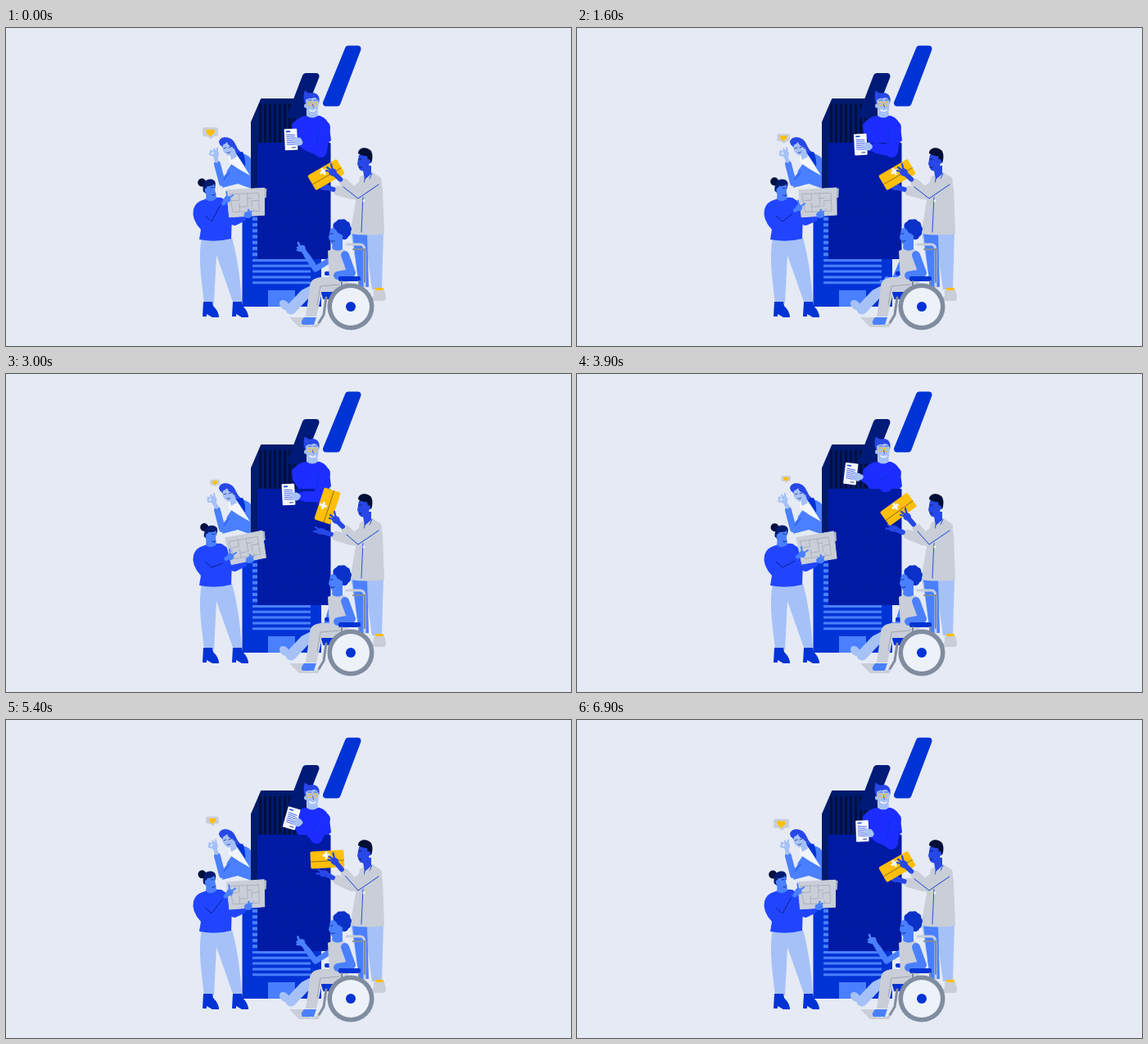
An HTML page with a canvas for the animation above (7 s loop, 690 by 388 pixels).

```html
<!DOCTYPE html>
<html lang="en">
<head>
<meta charset="utf-8">
<title>Team around a tower</title>
<style>
html, body { margin: 0; width: 100%; height: 100%; overflow: hidden; background: #e5eaf4; }
canvas { display: block; width: 690px; height: 388px; }
</style>
</head>
<body>
<canvas id="stage"></canvas>
<script>
const LOOP = 7000, STEP = 100;
const BG = '#e5eaf4', NAVY = '#000f3f', DARK = '#001a6e', PANEL = '#001ba6', BLUE = '#0033d5',
  VIVID = '#1c2dff', SWEATER = '#2145ff', MID = '#2747e6', SKY = '#4a80ff', PALE = '#a6c1f7',
  GRAY = '#c9ced8', STEEL = '#808c9f', GOLD = '#ffbf0a', WHITE = '#f3f6fc';

const canvas = document.getElementById('stage');
const ratio = window.devicePixelRatio || 1;
canvas.width = 690 * ratio;
canvas.height = 388 * ratio;
const c = canvas.getContext('2d');
c.lineCap = c.lineJoin = 'round';
let t = 0;

// Motion: one cosine per loop, or eased moves [from, to, ...change] added to a rest pose
const wave = (mid, amp, peak) => mid + amp * Math.cos((t - peak) / LOOP * 2 * Math.PI);
function ramp(from, to) {
  const u = Math.min(1, Math.max(0, (t - from) / (to - from)));
  return u * u * (3 - 2 * u);
}
const travel = (rest, ...moves) => rest.map((v, i) =>
  moves.reduce((sum, [from, to, ...change]) => sum + ramp(from, to) * (change[i] || 0), v));

function fill(color, d, round = 0) {
  const p = new Path2D(d);
  c.fillStyle = c.strokeStyle = color;
  c.fill(p);
  if (round) { c.lineWidth = round; c.stroke(p); }
}
function line(color, width, d) {
  c.strokeStyle = color;
  c.lineWidth = width;
  c.stroke(new Path2D(d));
}
function oval(color, x, y, rx, ry = rx, tilt = 0) {
  c.fillStyle = color;
  c.beginPath();
  c.ellipse(x, y, rx, ry, tilt, 0, 7);
  c.fill();
}
function rect(color, x, y, w, h, r = 0) {
  c.fillStyle = color;
  c.beginPath();
  c.roundRect(x, y, w, h, r);
  c.fill();
}
const limb = (color, width, ...pts) => line(color, width, 'M' + pts.map(p => p[0] + ' ' + p[1]).join('L'));
const toward = (a, b, f) => [a[0] + (b[0] - a[0]) * f, a[1] + (b[1] - a[1]) * f];

function at([x, y, deg = 0], draw, scale = 1) {
  c.save();
  c.translate(x, y);
  c.rotate(deg * Math.PI / 180);
  c.scale(scale, scale);
  draw();
  c.restore();
}

function bubble() {
  at([wave(252.5, -3, 0), wave(129, 6, 2000)], () => {
    rect(GRAY, -9.5, -6.5, 19, 11, 2.5);
    fill(GRAY, 'M-4 4H5L1 8Z');
    fill(GOLD, 'M0 4.5C-8 -1 -5 -5 -2 -4Q0 -4 0 -2.5Q0 -4 3 -4C6 -4 7 0 0 4.5Z');
  }, wave(.79, .21, 0));
}

function wavingWoman() {
  const hand = [wave(253.5, 1.5, 0), 152.5, wave(-6, 6, 0)];
  fill(MID, 'M260 140C260 132 272 131 278 138C283 146 283 150 289 152Q294 158 290 163L276 161Z');
  fill(SKY, 'M283 155L289 153Q299 156 300 162V196L283 190L264 195L270 174Z');
  fill(WHITE, 'M272 155L281 153L298 180L284 172L272 164Z');
  fill(BLUE, 'M281 153L289 151Q293 160 292 169Z');
  fill(PALE, 'M272 150L279 147L282 157L275 161Z');
  oval(PALE, 271, 147, 6.3, 8.3, -.35);
  fill(MID, 'M261 143Q264 133 273 136L278 146Q271 144 270 139Q267 143 261 143Z');
  line(DARK, .7, 'M266 147l3 -1M272 146l3 -1M270 152q3 1 4 -1');
  limb(SKY, 8, [258, 166], [264, 189], [277, 175]);
  line(BLUE, .7, 'M266 185L273 176');
  limb(PALE, 5, [257, 162], [hand[0] + 1, hand[1] + 3]);
  at(hand, () => {
    oval(PALE, 1, 1, 4, 5);
    line(PALE, 2.2, 'M-1 0L-5 -3M3 -1L3 -6M0 0L-1 -5M-2 3L-6 2L-5 -2');
    oval(BG, -2.5, 0, 1.2);
  });
}

function towerBack() {
  fill(BLUE, 'M418 25.5H429.5L404.5 91.5H391Z', 8);
  fill(DARK, 'M312 87H366V142H307V232H300V115Z', 2);
  for (let x = 309; x < 352; x += 6) rect(NAVY, x, 93, 3, 47);
  fill('#001a78', 'M366 59H378.5L360 106H348Z', 8);
}

function topMan() {
  fill(VIVID, 'M349 118Q356 108 367 107H383Q393 110 395 121L397 137L388 146H361L350 129Z');
  at([374, 108, t < 800 ? 1.5 * Math.sin(t / 800 * Math.PI) : 0], () => {
    c.translate(-374, -108);
    fill(PALE, 'M368 98H380L381 107Q374 112 367 107Z');
    fill(MID, 'M365 92C363 87 363 81 365 76Q369 81 374 79C382 79 384 86 382 92Z');
    fill(PALE, 'M366 88Q369 85 373 86Q379 83 382 90L381 100Q378 106 374 106Q368 105 367 99Z');
    oval(PALE, 366, 95, 2, 2.7);
    for (const x of [368.5, 374.8]) line(GOLD, 1, `M${x} 92.5a2.5 2.5 0 1 0 5 0a2.5 2.5 0 1 0 -5 0`);
    line(MID, .8, 'M369 88h4M376 88h4M374.5 93l1 4');
    line(WHITE, 1.6, 'M371 100Q375 103 378 100');
  });
}

function towerFront() {
  rect(BLUE, 288.5, 226, 96.5, 114);
  rect(PANEL, 307, 140, 89.5, 142, 1);
  for (let y = 144; y < 280; y += 4) for (let x = 310; x < 395; x += 4) rect('#001893', x, y, 1.4, 1.4);
  for (let y = 231; y < 279; y += 7.2) rect(SKY, 301, y, 6, 4);
  for (let i = 0; i < 5; i++) rect(SKY, 301, 282 + i * 6.8, 71, 3);
  rect(SKY, 320, 320, 33, 20);
}

function cardArm() {
  const card = travel([348, 136, -3], [0, 3000, -3, 11], [3000, 4000, -11, -26, 10],
    [4800, 5900, 26, -2, 16], [6100, 7000, -12, 17, -26]);
  const elbow = travel([384, 150], [3000, 4000, -7, -14], [4800, 5900, 4, 12], [6100, 7000, 3, 2]);
  const wrist = [card[0] + 7, card[1] + 2];
  limb(VIVID, 16, [388, 121], elbow);
  limb(VIVID, 13, elbow, toward(wrist, elbow, .42));
  limb(VIVID, 10, elbow, toward(wrist, elbow, .25));
  line(BLUE, .8, `M382 123L${elbow[0] - 5} ${elbow[1] - 8}`);
  limb(PALE, 6, wrist, toward(wrist, elbow, .15));
  at(card, () => {
    rect(WHITE, -7.8, -13, 15.6, 26, 1);
    rect(BLUE, -5.5, -10.5, 5, 1.4);
    for (let y = -6; y < 7; y += 2.3) line(MID, .8, `M-5 ${y}L5 ${y + 1}`);
    line(DARK, .8, 'M1 10H5');
    oval(PALE, 9, 3, 4.5, 5);
    line(PALE, 2.6, 'M8 0L4 -2M8 3L3 2M8 6L4 6');
  });
}

function plannerWoman() {
  const plan = travel([293, 213, -2], [0, 1000, 3.5, 1, 10], [1000, 2100, -3.5, -2, -18], [3000, 6000, 0, 1, 8]);
  const holder = [plan[0] + 2 - plan[2] * .26, plan[1] + 15];
  const pointer = [wave(272.5, 2.5, 4000), 208 + 14 * (ramp(400, 2200) - ramp(3000, 6000))];
  fill(PALE, 'M239 256H276C282 277 286 305 288 334H277L257 277L254 336H242C239 308 234 280 239 256Z');
  for (const x of [241, 277]) fill(BLUE, `M${x} 334h11l1 5q7 7 7 14h-8l-7-4v3h-5z`);
  limb(SWEATER, 10, [270, 232], [279, 236], toward(holder, [275, 238], .35));
  fill(SWEATER, 'M240 210Q250 206 263 207Q275 213 276 228L275 257Q256 262 236 258L238 246Q226 233 229 221Q232 212 240 210Z');
  fill(SKY, 'M245 200H256L257 208Q251 214 244 209Z');
  at([249, 203, wave(2, 6, 2900)], () => {
    oval(NAVY, -9, -15, 5);
    fill('#001a70', 'M-8 -4C-9 -16 -3 -20 4 -18Q9 -16 7 -9L-1 -8L-3 0Z');
    fill(SKY, 'M-3 -10Q4 -10 6 -13L7 0Q6 7 1 6Q-5 5 -5 -3Z');
    oval(SKY, -4, -5, 2, 3);
    line(DARK, .8, 'M2 -8h2M6 -8h1M3 1Q6 2 7 0');
  });
  at(plan, () => {
    fill('#adb5c4', 'M20 -17L26 -16L25 -5L21 -5Z');
    fill(GRAY, 'M-23 -16L23 -17L22 16L-21 17Z', 1);
    line('#a3acbb', .8, 'M-19 -11H16V11H-16ZM-8 -11V-3H-18M-8 1V11M-8 5H2V-11M2 -5H8M16 -2H7V5M2 8V11M9 11V8');
  });
  oval(SKY, ...holder, 5, 4);
  line(SKY, 2.3, `M${holder}l4 -4m-4 4l1 -6`);
  const elbow = [245, 241], wrist = toward(pointer, elbow, .18);
  limb(SWEATER, 14, [237, 221], elbow);
  limb(SWEATER, 11, elbow, toward(pointer, elbow, .38));
  line(DARK, .8, `M243 229L251 236L${pointer[0] - 9} ${pointer[1] + 9}`);
  limb(SKY, 5, wrist, pointer);
  oval(SKY, pointer[0], pointer[1] + 1, 4);
  line(SKY, 2, `M${pointer}l-1 -8m2 8l6 -4`);
}

function doctor() {
  const kit = travel([391, 179, -30], [2200, 3000, 1.5, -18, -42], [3100, 4700, 0, 8, 72], [5000, 7000, -1.5, 10, -30]);
  const top = travel([399, 176], [2200, 3000, 4, 2], [3100, 4700, 0, -8], [4800, 6200, -4, 6]);
  const low = travel([389, 194], [2200, 3000, -4, -2], [3100, 4700, 3, -7], [4800, 6600, 1, 9]);
  fill(PALE, 'M421 248H461L459 319H447L441 275L440 300H429Z');
  fill(SKY, 'M423 250H441L443 316H431Z');
  rect(GOLD, 451, 317, 10, 3);
  fill(GRAY, 'M449 320H462Q466 331 462 333H446Q446 329 449 327Z');
  const lowElbow = [422, 203];
  limb(GRAY, 12, [438, 190], lowElbow, toward(low, lowElbow, .5));
  limb(MID, 6, low, toward(low, lowElbow, .32));
  oval(MID, ...low, 6, 4);
  line(MID, 2.4, `M${low}l-7 -5m7 6l-9 -1`);
  fill(GRAY, 'M432 182Q441 176 449 177Q458 181 460 196L462 251Q441 254 420 251L428 206Z');
  fill(MID, 'M435 168H446L446 178L438 185Z');
  fill(MID, 'M431 155Q438 149 444 156L443 171Q438 177 432 173L429 166Z');
  fill('#000d35', 'M430 153C430 145 441 144 446 150Q449 157 446 165L442 161L441 156Q435 157 430 153Z');
  oval(MID, 443, 163, 2, 3);
  line(NAVY, .8, 'M431 160h3M431 170h3');
  line(BLUE, .8, 'M438 184L436 204L434 249M447 177L439 196');
  oval(WHITE, 437, 211, 1.4);
  at(kit, () => {
    rect(GOLD, -20.5, -10.5, 41, 21, 2);
    line('#8c6b18', .9, 'M-20 2H20');
    rect(WHITE, -5.5, -6.5, 9, 3);
    rect(WHITE, -2.5, -9.5, 3, 9);
  });
  const elbow = [428, 203];
  limb(GRAY, 14, [452, 187], elbow);
  limb(GRAY, 11, elbow, toward(top, elbow, .48));
  line(BLUE, .9, `M455 191L430 208L${top[0] + 13} ${top[1] + 18}`);
  limb(MID, 6, top, toward(top, elbow, .32));
  oval(MID, ...top, 5, 4.5, .6);
  line(MID, 2.3, `M${top}l-8 -2m8 1l-7 -5m7 4l-2 -8`);
}

function wheelchairMan() {
  const hand = travel([361, 268, 0], [200, 1000, 2, 38, -60], [1000, 2000, 23, 2, -10],
    [3800, 4800, -28, -24, 62], [4800, 5600, 3, -16, 8]);
  const elbow = travel([378, 294], [200, 1000, 4, 11], [1000, 2000, 9, 3], [3800, 4800, -13, -14]);
  line(GRAY, 3, 'M416 264H432Q438 264 438 271V316');
  line(STEEL, 2, 'M424 270H439M438 271V310');
  limb(SKY, 7, [399, 281], elbow, toward(hand, elbow, .4));
  limb(SKY, 6, elbow, hand);
  at(hand, () => {
    rect(SKY, -4.5, -3, 9, 8, 3);
    line(SKY, 2.6, 'M-2 0L-4 -6M-3 0H-5M-2 3H-5');
  });
  rect(BLUE, 389, 297, 8, 5, 2);
  limb(PALE, 13, [385, 315], [365, 325], [348, 343]);
  oval(PALE, 340, 338, 7, 5, .8);
  fill(GRAY, 'M393 272Q403 266 413 270Q420 279 418 308H395Z');
  fill(SKY, 'M399 260H411L411 270Q404 274 398 269Z');
  fill(SKY, 'M396 246Q403 239 411 247L411 260Q406 267 398 264L394 256Z');
  for (let a = -2.5; a < 1.4; a += .6) oval('#0a32c8', 410 + 7 * Math.cos(a), 246 + 8 * Math.sin(a), 5);
  oval('#0a32c8', 409, 245, 6);
  oval(SKY, 409, 255, 2.2, 3);
  line(DARK, .8, 'M396 251h3M397 260q2 1 4 0');
  fill(GRAY, 'M412 304L384 304Q370 306 371 317L366 352H379L386 323L408 329Q420 322 418 307Z');
  line('#929bab', .8, 'M407 313L384 315L380 338');
  fill(BLUE, 'M386 323H406V330H388Z', 2);
  line(STEEL, 3, 'M391 329L388 350L382 360');
  fill(GRAY, 'M346 353H364L372 363L384 360L381 365H358Z');
  fill(SKY, 'M364 353H379L376 362H362Q359 358 364 353Z');
  limb(SKY, 10, [414, 277], [422, 299], [405, 302]);
  rect(BLUE, 406, 303, 27, 6, 2);
  line(STEEL, 2, 'M410 309V321M431 309V318');
  oval(STEEL, 421, 340, 28.5);
  oval('#edf1f8', 421, 340, 23);
  oval(BLUE, 421, 340, 6);
}

const scene = [bubble, wavingWoman, towerBack, topMan, towerFront, cardArm, plannerWoman, doctor, wheelchairMan];
const start = performance.now();

function frame() {
  t = Math.floor((performance.now() - start) % LOOP / STEP) * STEP;
  c.setTransform(ratio, 0, 0, ratio, 0, 0);
  rect(BG, 0, 0, 690, 388);
  for (const draw of scene) draw();
  requestAnimationFrame(frame);
}
frame();
</script>
</body>
</html>
```
